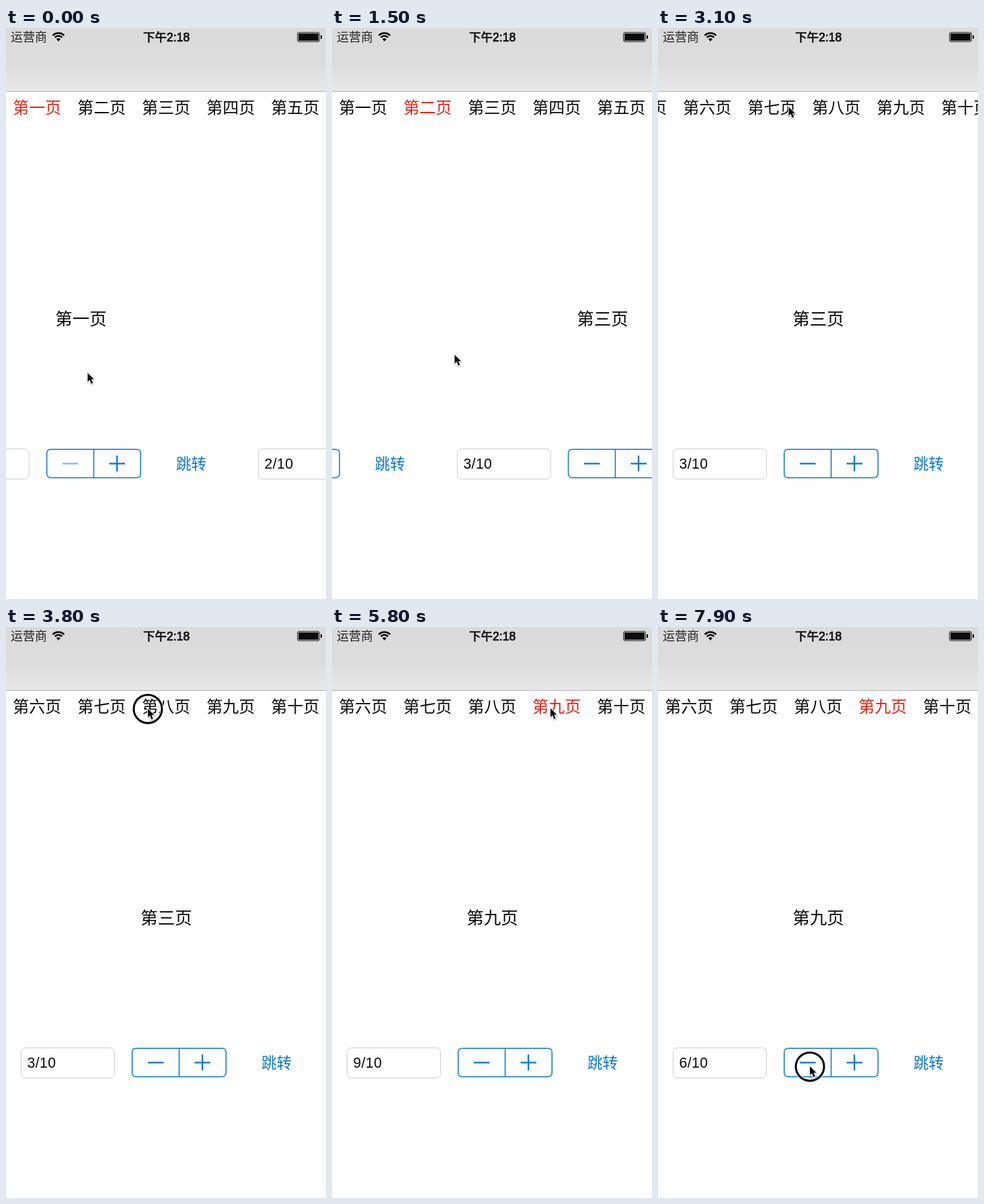
Animation of 476x850 px, one loop 8 s. Source, as an HTML page with a canvas:

```html
<!DOCTYPE html>
<html lang="zh">
<head>
<meta charset="utf-8">
<style>
html, body { margin: 0; width: 476px; height: 850px; overflow: hidden; background: #fefefe }
canvas { display: block }
</style>
</head>
<body>
<canvas id="stage" width="476" height="850"></canvas>
<script>
const ctx = document.getElementById('stage').getContext('2d');
const LOOP = 8000, STEP = 100, PITCH = 480, TAB = 96;
const BLUE = '#0676dc', RED = '#ea2010', INK = '#0a0a0a';
const CJK = '"Noto Sans CJK SC", "Noto Sans CJK", sans-serif';
const LATIN = '"Liberation Sans", Arial, sans-serif';
const pageName = n => '第' + '一二三四五六七八九十'[n - 1] + '页';

const smooth = p => p * p * (3 - 2 * p);
const out = p => 1 - (1 - p) ** 3;
const linear = p => p;

// Tracks are lists of [time, values, easing into this key].
const pointer = [
  [0, [121.5, 513.5]], [100, [121.5, 513.5]], [700, [339.5, 484], smooth], [1000, [339.5, 484]],
  [1400, [180, 492], smooth], [1800, [190, 470]], [2400, [320, 116], smooth],
  [2700, [182.5, 114.5], linear], [3600, [211, 121.5], smooth], [4000, [211, 121.5]],
  [4400, [185, 120.5], smooth], [5000, [185, 120.5]], [5400, [325, 121], smooth],
  [5800, [325, 121]], [6500, [308, 653], smooth], [6800, [226, 654], smooth]
];
const pages = [
  [0, [127]], [500, [480], out], [1000, [480]], [1400, [640], smooth], [1900, [960], out]
];
const tabs = [[2400, [0]], [2700, [137], linear], [3400, [480], out]];
const presses = [[1000, 1400], [2400, 2700], [3700, 3900], [5400, 5600], [6900, 7100], [7300, 7500], [7800, 8000]];
const selected = [[0, 1], [500, 2], [1900, 3], [3900, 8], [5600, 9]];
const count = [[0, 9], [6900, 8], [7300, 7], [7800, 6]];

function at(track, t) {
  const i = track.findIndex(k => k[0] > t);
  if (i === 0) return track[0][1];
  if (i < 0) return track[track.length - 1][1];
  const [t0, from] = track[i - 1], [t1, to, ease = linear] = track[i];
  const p = ease((t - t0) / (t1 - t0));
  return from.map((v, k) => v + (to[k] - v) * p);
}
const latest = (list, t) => list.filter(k => k[0] <= t).pop()[1];

function text(str, x, y, size, color = INK, align = 'center', family = CJK, bold = 0) {
  ctx.font = `300 ${size}px ${family}`;
  ctx.textAlign = align;
  ctx.fillStyle = ctx.strokeStyle = color;
  ctx.fillText(str, x, y);
  if (bold) {
    ctx.lineWidth = bold;
    ctx.strokeText(str, x, y);
  }
}

function box(x, y, w, h, r, color, width) {
  ctx.beginPath();
  ctx.roundRect(x, y, w, h, r);
  ctx.strokeStyle = color;
  ctx.lineWidth = width;
  ctx.stroke();
}

function rect(x, y, w, h, color) {
  ctx.fillStyle = color;
  ctx.fillRect(x, y, w, h);
}

function header() {
  const g = ctx.createLinearGradient(0, 0, 0, 94);
  g.addColorStop(0, '#dadada');
  g.addColorStop(0.6, '#dddddd');
  g.addColorStop(1, '#e8e8e8');
  rect(0, 0, 476, 94, g);
  rect(0, 94, 476, 1, '#b2b2b2');

  text('运营商', 7, 20, 18, '#222', 'left');
  text('下午', 204, 19.5, 17.6, INK, 'left', CJK, 0.6);
  text('2:18', 239, 19.5, 17.6, INK, 'left', LATIN, 0.7);

  ctx.strokeStyle = INK;
  ctx.lineWidth = 2.5;
  for (const r of [7.2, 11.6]) {
    ctx.beginPath();
    ctx.arc(78, 19, r, -Math.PI * 0.76, -Math.PI * 0.24);
    ctx.stroke();
  }
  ctx.beginPath();
  ctx.moveTo(78, 20);
  ctx.arc(78, 19.5, 4.2, -Math.PI * 0.76, -Math.PI * 0.24);
  ctx.fillStyle = INK;
  ctx.fill();

  box(433.5, 6.5, 33, 14, 2.5, '#222', 1);
  rect(435, 8, 30, 11, INK);
  rect(468, 11, 2, 5, INK);
}

function page(n, x, value) {
  text(pageName(n), x + 238.6, 441.5, 25.5);
  box(x + 22.5, 626.5, 139, 45, 7, '#d0d0d0', 1);
  ctx.letterSpacing = '0.4px';
  text(value + '/10', x + 31.6, 656, 21.2, INK, 'left', LATIN);
  ctx.letterSpacing = '0px';

  box(x + 187.7, 627.2, 139.6, 42.2, 5.5, BLUE, 1.5);
  rect(x + 256.8, 627, 1.5, 42.5, BLUE);
  rect(x + 211, 647.3, 23.5, 2.3, n === 1 ? '#83bdf0' : BLUE);
  rect(x + 280.5, 647.3, 23.5, 2.3, BLUE);
  rect(x + 291, 636.5, 2.3, 23.5, BLUE);
  text('跳转', x + 402.5, 657, 22.5, BLUE);
}

function cursor(x, y, down) {
  if (down) {
    for (const [color, width] of [['#fff', 5], ['#000', 3]]) {
      ctx.beginPath();
      ctx.arc(x, y + 0.5, 21, 0, 7);
      ctx.strokeStyle = color;
      ctx.lineWidth = width;
      ctx.stroke();
    }
  }
  ctx.save();
  ctx.translate(x, y);
  ctx.shadowColor = 'rgba(0,0,0,.35)';
  ctx.shadowBlur = 2;
  ctx.shadowOffsetY = 1;
  const arrow = new Path2D('M0 0V13L3 10.3L5.4 16L7.8 15L5.4 9.5H9.5Z');
  ctx.strokeStyle = '#fff';
  ctx.lineWidth = 2;
  ctx.stroke(arrow);
  ctx.shadowColor = 'transparent';
  ctx.fillStyle = '#000';
  ctx.fill(arrow);
  ctx.restore();
}

function draw(now) {
  const t = Math.floor(now % LOOP / STEP) * STEP;
  const current = latest(selected, t);
  rect(0, 0, 476, 850, '#fefefe');
  header();

  const [scroll] = at(tabs, t);
  for (let n = 1; n <= 10; n++)
    text(pageName(n), 46.2 + (n - 1) * TAB - scroll, 127, 24, n === current ? RED : INK);

  if (t >= 3900) page(current, 0, current === 9 ? latest(count, t) : current);
  else {
    const [offset] = at(pages, t);
    for (let n = 1; n <= 4; n++) page(n, (n - 1) * PITCH - offset, n);
  }

  const [x, y] = at(pointer, t);
  cursor(x, y, presses.some(([a, b]) => t >= a && t < b));
}

const start = performance.now();
function tick() {
  draw(performance.now() - start);
  requestAnimationFrame(tick);
}
tick();
</script>
</body>
</html>
```
